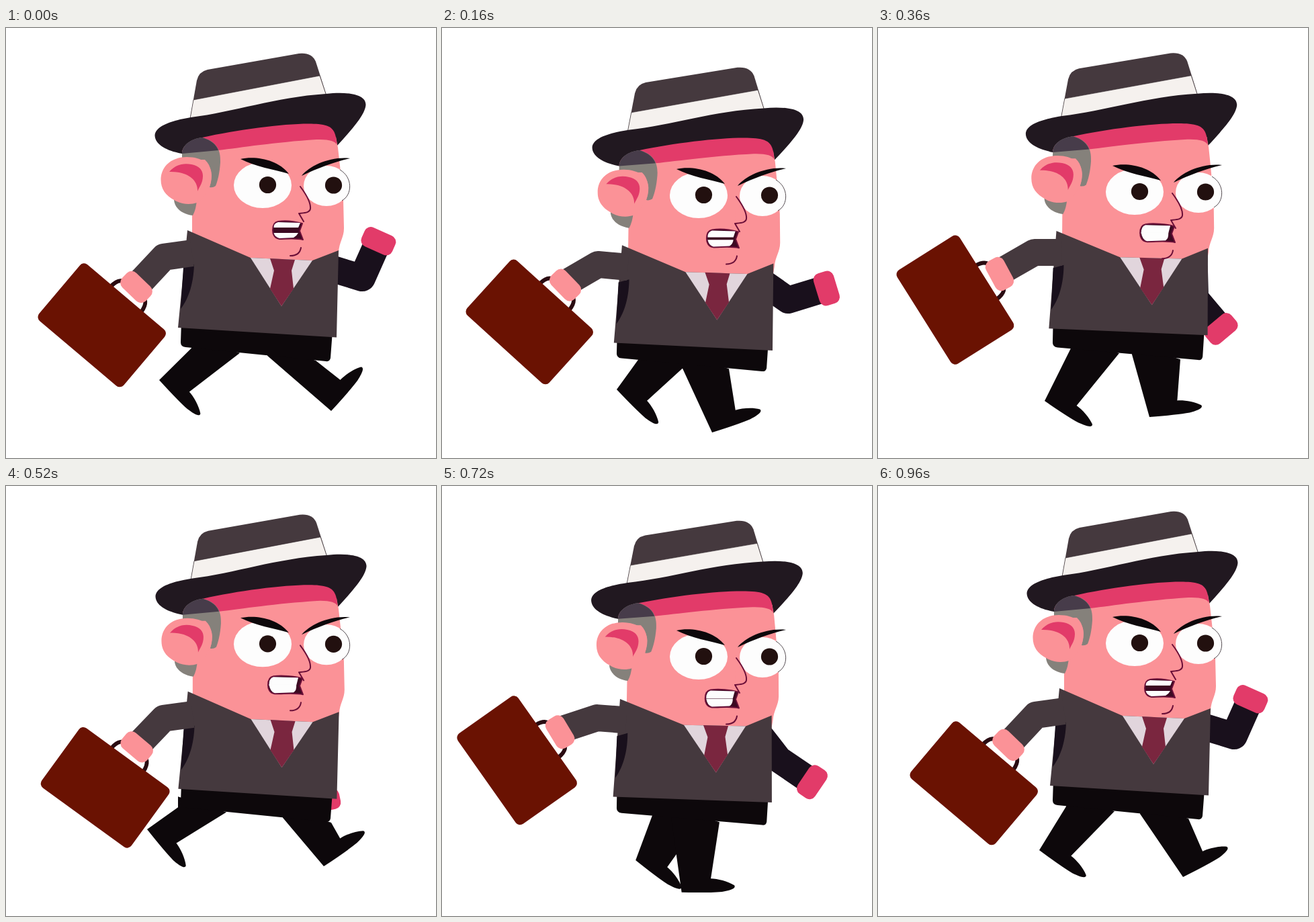
These frames come from a looping animation (640 by 640 pixels, 1000 ms). An HTML page:

```html
<!DOCTYPE html>
<html lang="en">
<head>
<meta charset="utf-8">
<title>Angry walker</title>
<style>
  html, body { margin: 0; width: 100%; height: 100%; overflow: hidden; background: #fff; }
  svg { display: block; width: 100vw; height: 100vh; }
  .suit { fill: #45393e; }
  .skin { fill: #fb9297; }
  .pink { fill: #e23b69; }
  .hair { fill: #85817b; }
  .dark { fill: #19101c; }
  .brim { fill: #211820; }
  .pants { fill: #0d080b; }
  .white { fill: #fdfdfd; }
  .pupil { fill: #22100f; }
  .line { fill: none; stroke: #6b0f38; stroke-width: 2; stroke-linecap: round; stroke-linejoin: round; }
  .limb { fill: none; stroke-width: 40; stroke-linejoin: round; }
</style>
</head>
<body>
<svg viewBox="0 0 640 640">
  <path id="farArm" class="limb" stroke="#19101c"/>
  <rect id="fist" class="pink" x="-25" y="-15.5" width="50" height="31" rx="10"/>

  <path id="legA" class="pants"/>
  <path id="legB" class="pants"/>
  <path id="hips" class="pants" d="M261 436 L486 450 L483 490 Q482 496 476 495 L267 474 Q260 473 260 467 Z"/>

  <g id="head">
    <path class="suit" d="M274 134 L284 78 Q287 65 300 62 L436 38 Q455 36 461 50 L477 100 Z"/>
    <path fill="#f5f1ee" stroke="#2a2026" stroke-width=".6" d="M279 107 L467 71 L477 101 L274 135 Z"/>
    <path class="brim" d="M221.5 160 C222 144 252 137 275 133 C340 125 400 103 476 98 C505 95 535 97 535.5 114 C535 129 514 152 493 175 L262 187 C240 183 222 174 221.5 160 Z"/>
    <path class="skin" d="M277 190 L300 165 L491 162 L494 178 L497 205 L502 255 L503 298 C503 312 496 318 495 334 L490 365 L277 365 Z"/>
    <path class="pink" d="M262 187 C262 172 280 166 292 163 C350 150 430 140 465 143 C485 145 491 151 492.5 174 Q489 165 462 166 C400 170 350 178 316 182 Z"/>
    <path class="hair" d="M262 187 C262 172 280 164 292 163 C312 168 320 180 319 200 C318 216 315 228 312 235 Q308 238 303 237 C308 220 306 205 296 196 L262 196 Z"/>
    <path fill="#473c4a" d="M262 187 C262 172 280 164 292 163 C306 167 313 174 316 182 Z"/>
    <path class="hair" d="M250 256 C251 268 262 277 278 279 Q283 270 284 255 Z"/>
    <path class="skin" d="M230.5 226 C230.5 206 246 192 269 192 C292 192 306 203 306 219 C306 238 297 246 291 256 L284 260 C276 263 262 263 252 257 C238 250 230.5 240 230.5 226 Z"/>
    <path class="pink" d="M243 214 C253 202 266 201 276 203 C288 205 293 212 293 220 C293 231 288 236 285 243 C286 226 270 213 243 214 Z"/>
  </g>

  <g id="torso">
    <path class="suit" d="M270 301 L364 342 L456 346 L495 331 L492 460.5 L256 446 Z"/>
    <path fill="#e1d5dc" d="M364 342 L456 346 L410 414 Z"/>
    <path fill="#7a263f" d="M393 343 L430 345 L425 361 L428 388 L410 414 L393 388 L399 361 Z"/>
    <path class="dark" d="M264 356 L280 352 C279 384 270 405 260 418 Z"/>
  </g>

  <g id="eyes">
    <ellipse class="white" cx="382" cy="234" rx="43" ry="34"/>
    <ellipse class="white" cx="477" cy="235" rx="34" ry="30"/>
    <path fill="none" stroke="#2a2026" stroke-width=".8" d="M497 211 C516 222 516 248 500 257"/>
    <circle class="pupil" cx="389.5" cy="233.5" r="12.6"/>
    <circle class="pupil" cx="487.5" cy="234" r="12.6"/>
    <path class="skin" d="M438 236 C447 248 454 260 453 269 C452 275 445 275 436 276 Z"/>
    <path class="line" d="M438 236 C447 248 454 260 453 269 C452 275 445 275 436 276 L443 288"/>
    <path class="pants" d="M349 195 C372 190 405 196 421 217 C400 211 370 206 349 195 Z"/>
    <path class="pants" d="M440 220 C452 205 482 191 512 194 C490 199 465 208 440 220 Z"/>
  </g>

  <g id="mouth">
    <path id="lips" class="line" style="fill:#3c0a22"/>
    <path id="upper" class="white"/>
    <path id="lower" class="white"/>
    <path class="line" d="M439 327 Q437 339 423 339"/>
  </g>

  <g id="bag">
    <path fill="none" stroke="#2a0c12" stroke-width="6" d="M-27 -53 C-26 -68 -20 -72 -8 -73 H14 C25 -73 31 -68 32 -53"/>
    <rect fill="#6a1202" x="-82.5" y="-55" width="165" height="110" rx="8"/>
  </g>
  <path id="nearArm" class="limb" stroke="#45393e"/>
  <rect id="hand" class="skin" x="-24.5" y="-15" width="49" height="30" rx="10"/>
</svg>

<script>
const FRAME = 40, LOOP = 1000, BOUNCE = 480, SWING = 960;
const $ = id => document.getElementById(id);
const rad = deg => deg * Math.PI / 180;
const set = (id, name, value) => $(id).setAttribute(name, value);
const move = (id, x, y, turn = 0, px = 0, py = 0) =>
  set(id, 'transform', `translate(${x} ${y}) rotate(${turn} ${px} ${py})`);

// Smooth cyclic track through keys [time, ...values], without overshoot.
function track(keys, period) {
  keys = [...keys].sort((a, b) => a[0] - b[0]);
  const n = keys.length;
  const key = i => keys[(i + 2 * n) % n];
  const time = i => key(i)[0] + Math.floor(i / n) * period;
  const slope = (i, c) => (key(i + 1)[c] - key(i)[c]) / (time(i + 1) - time(i));
  const tangent = (i, c) => {
    const a = slope(i - 1, c), b = slope(i, c);
    return a * b <= 0 ? 0 : 2 * a * b / (a + b);
  };
  return t => {
    t = (t % period + period) % period;
    let i = -1;
    while (i + 1 < n && time(i + 1) <= t) i++;
    const span = time(i + 1) - time(i), u = (t - time(i)) / span;
    return key(i).slice(1).map((from, j) => {
      const c = j + 1, to = key(i + 1)[c], ease = u * u * (3 - 2 * u);
      return from + (to - from) * ease
        + span * u * (1 - u) * ((1 - u) * tangent(i, c) - u * tangent(i + 1, c));
    });
  };
}

// Stride keys: time, heel x, heel y, foot angle, thigh centre x.
const stride = [
  [230, 350, 605, -3, 374],
  [300, 297, 586, 12, 356],
  [360, 248, 555, 29, 323],
  [460, 240, 542, 31, 316],
  [800, 346, 577, 15, 384],
  [860, 404, 579, -10, 414],
  [960, 454, 582, -32, 426]
];
const strideA = track([...stride,
  [0, 484, 570, -53, 425], [160, 402, 602, -23, 391],
  [520, 210, 511, 46, 292], [640, 245, 531, 43, 320]], LOOP);
const strideB = track([...stride,
  [20, 473, 566, -39, 448], [140, 405, 597, -17, 404],
  [500, 228, 524, 42, 312], [660, 260, 538, 41, 328]], LOOP);

// Far arm keys: time, elbow x, elbow y, fist angle.
const armSwing = track([
  [0, 530, 372, 24], [160, 515, 405, 73], [360, 472, 402, 140],
  [520, 460, 410, 168], [640, 486, 423, 155], [800, 514, 386, 84]], SWING);

function drawLeg(id, [x, y, angle, top], hipY) {
  const c = Math.cos(rad(angle)), s = Math.sin(rad(angle));
  const p = (u, v) => `${x + u * c - v * s} ${y + u * s + v * c}`;
  const hipAt = hx => `${hx} ${474 + hipY + (hx - 261) * 0.1}`;
  const l = hipAt(top - 36), r = hipAt(top + 36);
  // The thigh runs up into the hips.
  set(id, 'd', `M${p(0, 0)} L${l} v-16 L${r} v-16 L${r} L${p(45, -17)}
    C${p(55, -16)} ${p(70, -11)} ${p(79, -4)} C${p(82, 1)} ${p(72, 3)} ${p(60, 4)}
    Q${p(40, 4)} ${p(0, 0)} Z`);
}

function drawMouth(open, y) {
  const l = 390 + 7 * open, gap = 5 * open, r = 438 - 3 * (1 - open);
  move('mouth', 0, y);
  set('lips', 'd', `M${l + 8} 288 C${l + 20} 286 430 288 441 291 L437 302 L442 315
    C430 312 416 314 ${l + 10} 314 C${l + 2} 313 ${l} 306 ${l} 301 C${l} 293 ${l + 2} 289 ${l + 8} 288 Z`);
  set('upper', 'd', `M${l + 8} 289 L${r} 290 L${r - 3} ${302 - gap} H${l + 1.5} Q${l + 1} 291 ${l + 8} 289 Z`);
  set('lower', 'd', `M${l + 1.5} ${300 + gap} H${r - 3} Q433 309 428 312 L${l + 10} 313 Q${l + 3} 311 ${l + 1.5} ${300 + gap} Z`);
}

function draw(t) {
  const th = 2 * Math.PI * t / BOUNCE;
  const wave = (m, a, b, c = 0, d = 0) =>
    m + a * Math.cos(th) + b * Math.sin(th) + c * Math.cos(2 * th) + d * Math.sin(2 * th);

  const y = wave(7.67, -6.72, 9.62, -0.95, -1.36);
  const x = wave(-1.3, 1.3, 1.9);
  const lean = wave(-0.72, 0.72, 0.4);
  const hipY = 0.75 * y + 1;
  const eyeY = wave(10, -10, 0);

  move('head', x, y * 0.96, wave(0.5, -0.5, 0), 385, 340);
  move('torso', x * 0.5, y, lean, 374, 450);
  move('hips', 0, hipY, lean * 0.6, 374, 470);
  move('eyes', 0, eyeY);
  const open = Math.cos(Math.PI * t / SWING) ** 4;
  drawMouth(open, eyeY - 6 * (1 - open));

  drawLeg('legA', strideA(t), hipY);
  drawLeg('legB', strideB(t + LOOP / 2), hipY);

  const [ex, ey, turn] = armSwing(t);
  const dx = Math.cos(rad(turn - 90)), dy = Math.sin(rad(turn - 90));
  set('farArm', 'd', `M${474 + x} ${355 + y} L${ex} ${ey} L${ex + 50 * dx} ${ey + 50 * dy}`);
  move('fist', ex + 60 * dx, ey + 60 * dy, turn);

  const hx = wave(184.8, 9.2, 3.8);
  const hy = wave(376.33, 9.61, 10.77, -0.44, -1.64);
  const tilt = wave(47.5, -7.3, -10.3);
  const c = Math.cos(rad(tilt)), s = Math.sin(rad(tilt));
  move('bag', hx - 2.5 * c - 76.5 * s, hy - 2.5 * s + 76.5 * c, tilt);
  move('hand', hx, hy, tilt + 4);
  set('nearArm', 'd', `M${277 + x} ${335 + y} L${wave(233, 2, 0)} ${wave(343, -2.1, 9.1)} L${hx + 3} ${hy - 4}`);
}

const start = performance.now();
function tick() {
  const t = (performance.now() - start) % LOOP;
  draw(Math.floor(t / FRAME) * FRAME);
  requestAnimationFrame(tick);
}
tick();
</script>
</body>
</html>
```
